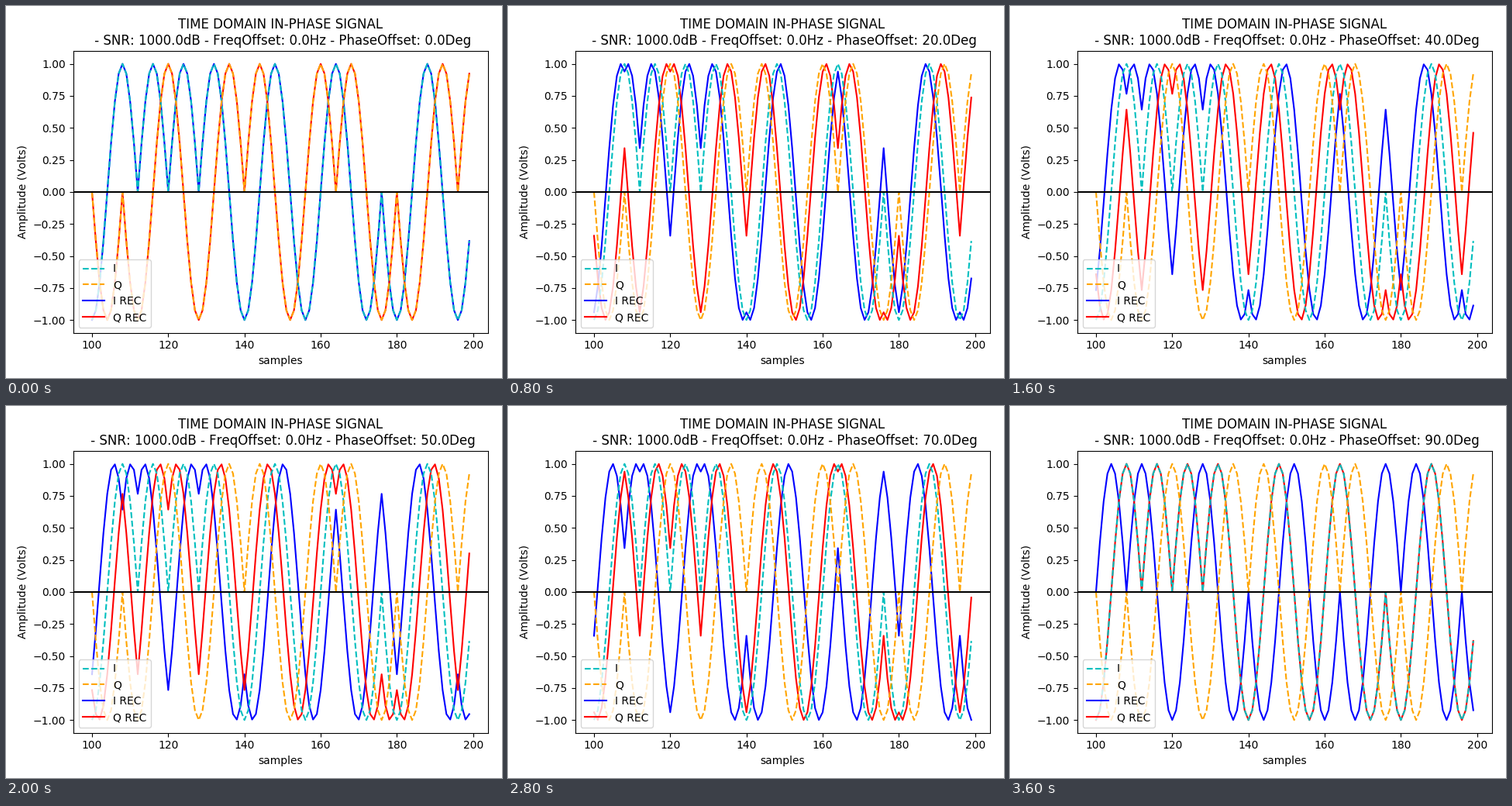
A matplotlib script for the animation above (4 s loop, 640x480 px).

```python
import numpy as np
import matplotlib.pyplot as plt
from matplotlib.animation import FuncAnimation

W, H, DPI = 640, 480, 100
HALF = 8  # samples per half-sine pulse
STEPS, STEP_DEG = 10, 10

n = np.arange(100, 200)


def pulses(signs, start):
    """Half-sine pulses, one per sign, the first beginning at sample `start`."""
    bits = np.array([1 if s == "+" else -1 for s in signs])
    k = (n - start) // HALF
    return bits[k] * np.abs(np.sin(np.pi * (n - start) / HALF))


i_sig = pulses("-++++-+-+--+-", 96)
q_sig = pulses("--+-++-++--++", 100)

plt.rcParams["font.family"] = "DejaVu Sans"
plt.rcParams["text.kerning_factor"] = 6  # classic letter spacing
fig, ax = plt.subplots(figsize=(W / DPI, H / DPI), dpi=DPI)

ax.plot(n, i_sig, "c--", label="I", zorder=2.2)
ax.plot(n, q_sig, "--", color="orange", label="Q", zorder=2.2)
i_rec, = ax.plot(n, i_sig, "b", label="I REC")
q_rec, = ax.plot(n, q_sig, "r", label="Q REC")
ax.axhline(0, color="k", zorder=2.4)

margin = 0.05 * (n[-1] - n[0])
ax.set_xlim(n[0] - margin, n[-1] + margin)
ax.set_ylim(-1.1, 1.1)
ax.set_xlabel("samples")
ax.set_ylabel("Amplitude (Volts)")
ax.legend(loc="lower left")
title = ax.set_title("")


def update(step):
    deg = float(step * STEP_DEG)
    c, s = np.cos(np.radians(deg)), np.sin(np.radians(deg))
    i_rec.set_ydata(i_sig * c - q_sig * s)
    q_rec.set_ydata(i_sig * s + q_sig * c)
    title.set_text("TIME DOMAIN IN-PHASE SIGNAL\n"
                   f" - SNR: 1000.0dB - FreqOffset: 0.0Hz - PhaseOffset: {deg}Deg")
    return i_rec, q_rec, title


def fit_layout(pad=15):
    """Tight layout that also makes room for the widest title on the right."""
    update(STEPS - 1)
    overhang = max(0, title.get_window_extent().x1 - ax.bbox.x1)
    fig.tight_layout()
    fig.subplots_adjust(right=(W - pad - overhang) / W)


fit_layout()
anim = FuncAnimation(fig, update, frames=STEPS, interval=400,
                     repeat=True, repeat_delay=0, blit=False)
plt.show()
```
